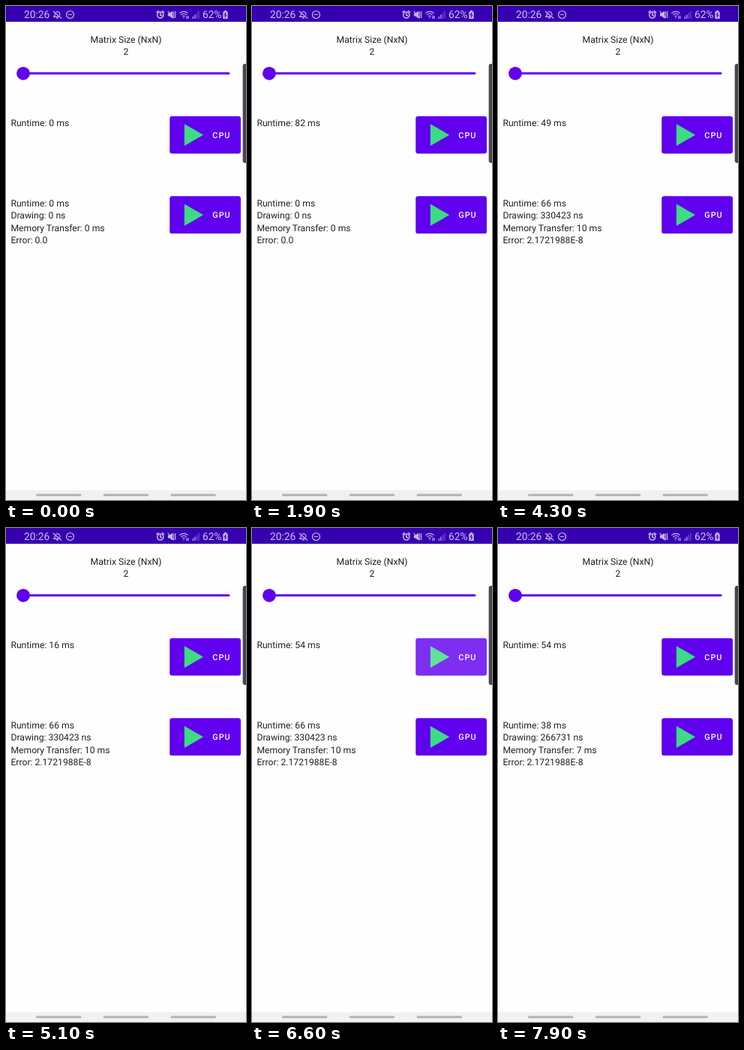
Write an HTML page that moves like this. It is 320 px wide and 658 px high and loops after 8000 ms.

```html
<!DOCTYPE html>
<html lang="en">
<head>
<meta charset="utf-8">
<title>Matrix benchmark</title>
<style>
  html, body { margin: 0; width: 100%; height: 100%; overflow: hidden; background: #fefdff; }
  svg { display: block; width: 320px; height: 658px; font: 12.18px Roboto, sans-serif; fill: #222; }
  text { text-rendering: geometricPrecision; }
  .status { font-size: 13.8px; fill: #d0c4ec; }
  .icon { fill: none; stroke: #c6b8e8; stroke-width: 1.2; stroke-linecap: round; stroke-linejoin: round; }
  .solid { fill: #c6b8e8; }
  .label { font-size: 10.9px; font-weight: 500; letter-spacing: .97px; fill: #fff; }
  .accent { fill: #6000ee; }
</style>
</head>
<body>
<svg viewBox="0 0 320 658">
  <rect width="320" height="21" fill="#3600b1"/>
  <g class="status">
    <text x="23.9" y="16.2">20:26</text>
    <text x="262" y="16.2">62%</text>
  </g>
  <g class="icon">
    <!-- bell off, do not disturb -->
    <path d="M63.3 7.2l10.4 9M70 14.3h-6.5l1.7-2V10.5M66.8 8a3.4 3.4 0 0 1 5 3v1.3M67.5 16.2h1.8"/>
    <circle cx="85.5" cy="11.5" r="5"/>
    <path d="M83.2 11.5h4.6"/>
    <!-- alarm -->
    <g stroke-width="1.6">
      <circle cx="205.8" cy="12" r="4"/>
      <path d="M205.8 9.8V12l1.8 1M201 8.3l2.2-1.8M210.6 8.3l-2.2-1.8"/>
    </g>
    <!-- muted, vibrating -->
    <path class="solid" d="M216.5 10h2l2.8-2.3v7.6l-2.8-2.3h-2z"/>
    <path d="M216 7l7 9M223.6 7.5l-.7 2 .7 2-.7 2 .7 2M226 7.5l-.7 2 .7 2-.7 2 .7 2"/>
    <!-- wifi -->
    <path d="M231.8 9.4a7.6 7.6 0 0 1 10.4 0M233.7 11.6a4.8 4.8 0 0 1 6.6 0M235.8 13.7a1.9 1.9 0 0 1 2.4 0M237 15.6v.4M241 13.5v3M243 13.5v3"/>
    <!-- signal -->
    <path d="M249.3 14.5v2M251.9 12v4.5"/>
    <path d="M254.5 9.5v7M257 7v9.5" opacity=".45"/>
    <!-- battery -->
    <path class="solid" stroke="none" d="M289.3 7.5h1.7V6h3v1.5h1.7v9.5h-6.4z"/>
    <path d="M293 9l-1.7 3h2.4l-1.7 3" stroke="#3600b1"/>
  </g>

  <g text-anchor="middle">
    <text x="160" y="48.5">Matrix Size (NxN)</text>
    <text x="160" y="65">2</text>
  </g>
  <rect class="accent" x="23" y="88.2" width="275.5" height="3.1" rx="1.5"/>
  <circle class="accent" cx="23" cy="89.8" r="8.9"/>

  <text class="row" x="6.4" y="160"></text>
  <text class="row" x="6.4" y="266.5"></text>
  <text class="row" x="6.4" y="283"></text>
  <text class="row" x="6.4" y="299.5"></text>
  <text class="row" x="6.4" y="316"></text>

  <g id="buttons"></g>

  <rect x="315.7" y="77" width="8" height="132" rx="3" fill="#48464c"/>
  <rect y="645" width="320" height="13" fill="#f1f0f2"/>
  <g fill="#b7b6b8">
    <rect x="40" y="649.7" width="60.5" height="3.2" rx="1.6"/>
    <rect x="129.7" y="649.7" width="60.5" height="3.2" rx="1.6"/>
    <rect x="219.5" y="649.7" width="60.5" height="3.2" rx="1.6"/>
  </g>
</svg>
<script>
const LOOP = 8000, STEP = 100;
const FADE = [.24, .18, .08];

const button = (name, y) => `<g transform="translate(218.3 ${y})">
  <rect y=".5" width="94.7" height="49.8" rx="3.2" fill="#000" opacity=".15"/>
  <rect class="accent" width="94.7" height="49.8" rx="3.2"/>
  <path d="M19.6 10.5L44.9 25 19.6 39.5z" fill="#3ddc84"/>
  <rect class="ripple" width="94.7" height="49.8" rx="3.2" fill="#fff" opacity="0"/>
  <text class="label" x="57" y="29.2">${name}</text></g>`;
document.getElementById('buttons').innerHTML = button('CPU', 146.7) + button('GPU', 253.3);

const rows = document.querySelectorAll('.row');
const ripples = document.querySelectorAll('.ripple');

// cpu: runtime; gpu: runtime, drawing, transfer. "early" shows the ripple one step before the result.
const presses = [
  { at: 1600, cpu: 82 },
  { at: 2900, gpu: [66, 330423, 10], early: true },
  { at: 4000, cpu: 49 },
  { at: 4800, cpu: 16, early: true },
  { at: 5300, cpu: 12 },
  { at: 5900, cpu: 9, early: true },
  { at: 6500, cpu: 54 },
  { at: 7100, gpu: [51, 261461, 4] },
  { at: 7600, gpu: [38, 266731, 7] },
];

function draw(now) {
  const t = Math.floor(now % LOOP / STEP) * STEP;
  let cpu = 0, gpu = [0, 0, 0], error = '0.0';
  const glow = [0, 0];
  for (const p of presses) {
    const age = (t - p.at) / STEP;
    const light = age === -1 && p.early ? .12 : FADE[age] || 0;
    if (light) glow[p.gpu ? 1 : 0] = light;
    if (age < 0) continue;
    if (p.gpu) {
      gpu = p.gpu;
      error = '2.1721988E-8';
    } else cpu = p.cpu;
  }
  [
    `Runtime: ${cpu} ms`,
    `Runtime: ${gpu[0]} ms`,
    `Drawing: ${gpu[1]} ns`,
    `Memory Transfer: ${gpu[2]} ms`,
    `Error: ${error}`,
  ].forEach((line, i) => { rows[i].textContent = line; });
  ripples.forEach((r, i) => r.setAttribute('opacity', glow[i]));
}

const start = performance.now();
function tick() {
  draw(performance.now() - start);
  requestAnimationFrame(tick);
}
tick();
</script>
</body>
</html>
```
